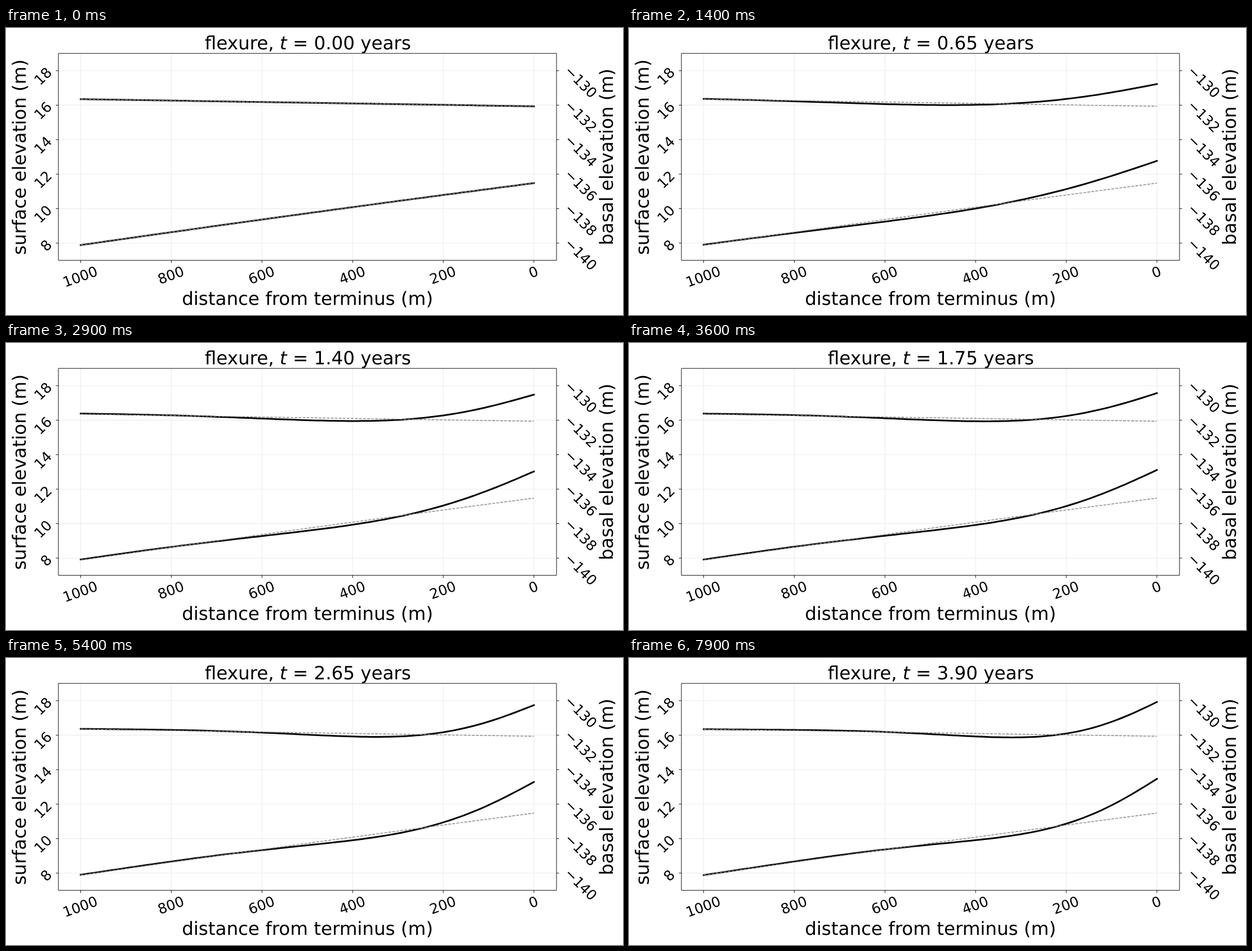
Recreate the animation shown at these times as an HTML page. Size 1095 by 511 pixels, loop 8 s.

```html
<!DOCTYPE html>
<html lang="en">
<head>
<meta charset="utf-8">
<title>Flexure</title>
<style>
html, body { margin: 0; width: 100%; height: 100%; overflow: hidden; background: #fff; }
svg { display: block; width: 1095px; height: 511px; }
text {
  font: 32.5px "DejaVu Sans", sans-serif;
  text-anchor: middle;
  text-rendering: geometricPrecision;
  white-space: pre;
}
.tick { font-size: 24.9px; }
.end { text-anchor: end; }
.grid path { stroke: #ececec; stroke-width: 1.1; }
.axes { fill: none; stroke: #111; stroke-width: 1; }
.curve { fill: none; stroke: #050505; stroke-width: 3; stroke-linecap: square; stroke-linejoin: round; }
.rest { fill: none; stroke: #848484; stroke-width: 1.4; stroke-dasharray: 5 2.16; }
</style>
</head>
<body>
<svg viewBox="0 0 1095 511">
  <g class="grid" id="grid"></g>
  <path class="curve" id="top"/>
  <path class="curve" id="base"/>
  <path class="rest" id="topRest"/>
  <path class="rest" id="baseRest"/>
  <path class="axes" id="axes"/>
  <g id="labels"></g>
  <text x="535.7" y="37.5">flexure, <tspan font-style="italic">t</tspan> = <tspan id="years">0.00</tspan> years</text>
  <text x="535" y="493.4">distance from terminus (m)</text>
  <text transform="translate(35.4 230) rotate(-90)">surface elevation (m)</text>
  <text transform="translate(1077 229.5) rotate(-90)">basal elevation (m)</text>
</svg>
<script>
const $ = id => document.getElementById(id);
const BOX = { l: 93, r: 977, t: 45.2, b: 413.7 };
const FRAME = 100, FRAMES = 80;
const px = d => 936.9 - d * 0.8044;         // distance in metres
const py = h => 413.7 - (h - 7) * 30.7;     // surface elevation in metres

function svgEl(parent, tag, attrs, text = '') {
  const el = document.createElementNS('http://www.w3.org/2000/svg', tag);
  for (const k in attrs) el.setAttribute(k, attrs[k]);
  el.textContent = text;
  parent.append(el);
}

function tickLabel(text, x, y, angle, cls = 'tick') {
  svgEl($('labels'), 'text', {
    class: cls, y: 9.1, transform: `translate(${x} ${y}) rotate(${angle})`
  }, text);
}

let axes = `M${BOX.l} ${BOX.t}H${BOX.r}V${BOX.b}H${BOX.l}Z`;
for (let d = 0; d <= 1000; d += 200) {
  const x = px(d), digits = String(d).length;
  svgEl($('grid'), 'path', { d: `M${x} ${BOX.t}V${BOX.b}` });
  axes += `M${x} ${BOX.b}v4.5`;
  tickLabel(d, x - 1, 434.2 + 2.75 * (digits - 1), -20);
}
for (let h = 8; h <= 18; h += 2) {
  const y = py(h);
  svgEl($('grid'), 'path', { d: `M${BOX.l} ${y}H${BOX.r}` });
  axes += `M${BOX.l} ${y}h-4.5M${BOX.r} ${y}h4.5`;
  tickLabel(h, 76.4, y - 1.7, -45, 'tick end');
  tickLabel('\u2212' + (148 - h), 1020.5, y + 19.7, 45);
}
$('axes').setAttribute('d', axes);

// Self-similar deflection of a viscous floating beam loaded at its end,
// as a power series: 2^(n/2) cos(3 pi n / 4) / (n! gamma(1 + (n + 1) / 4)).
const gamma = [0.9064025, 0.8862269, 0.9190625, 1];
const coef = [];
for (let n = 0, fact = 1; n < 56; n++) {
  if (n > 3) gamma[n] = gamma[n - 4] * (n + 1) / 4;
  if (n) fact *= n;
  coef[n] = gamma[0] * 2 ** (n / 2) * Math.cos(0.75 * Math.PI * n) / (fact * gamma[n]);
}
const shape = u => coef.reduceRight((sum, c) => sum * u + c, 0);

const topRest = s => 139.4 - 12.7 * s;
const baseRest = s => 276.2 + 110.3 * s - 5.6 * s * (1 - s);

function curve(rest, lift) {
  let path = '';
  for (let d = 1000; d >= 0; d -= 10)
    path += `${path ? 'L' : 'M'}${px(d).toFixed(2)} ${(rest(d / 1000) - lift(d)).toFixed(2)}`;
  return path;
}

const flat = () => 0;
$('topRest').setAttribute('d', curve(topRest, flat));
$('baseRest').setAttribute('d', curve(baseRest, flat));

let shown = -1;
function draw(ms) {
  const step = Math.floor(ms / FRAME) % FRAMES;
  if (step === shown) return;
  shown = step;
  const grow = (step * 0.05) ** 0.25;
  const lift = d => 43.3 * grow * shape(0.00457 * d * grow);
  $('top').setAttribute('d', curve(topRest, lift));
  $('base').setAttribute('d', curve(baseRest, lift));
  // The clock reads one step behind the solution.
  $('years').textContent = (Math.max(0, step - 1) * 0.05).toFixed(2);
}

const start = performance.now();
function loop() {
  draw(performance.now() - start);
  requestAnimationFrame(loop);
}
loop();
</script>
</body>
</html>
```
